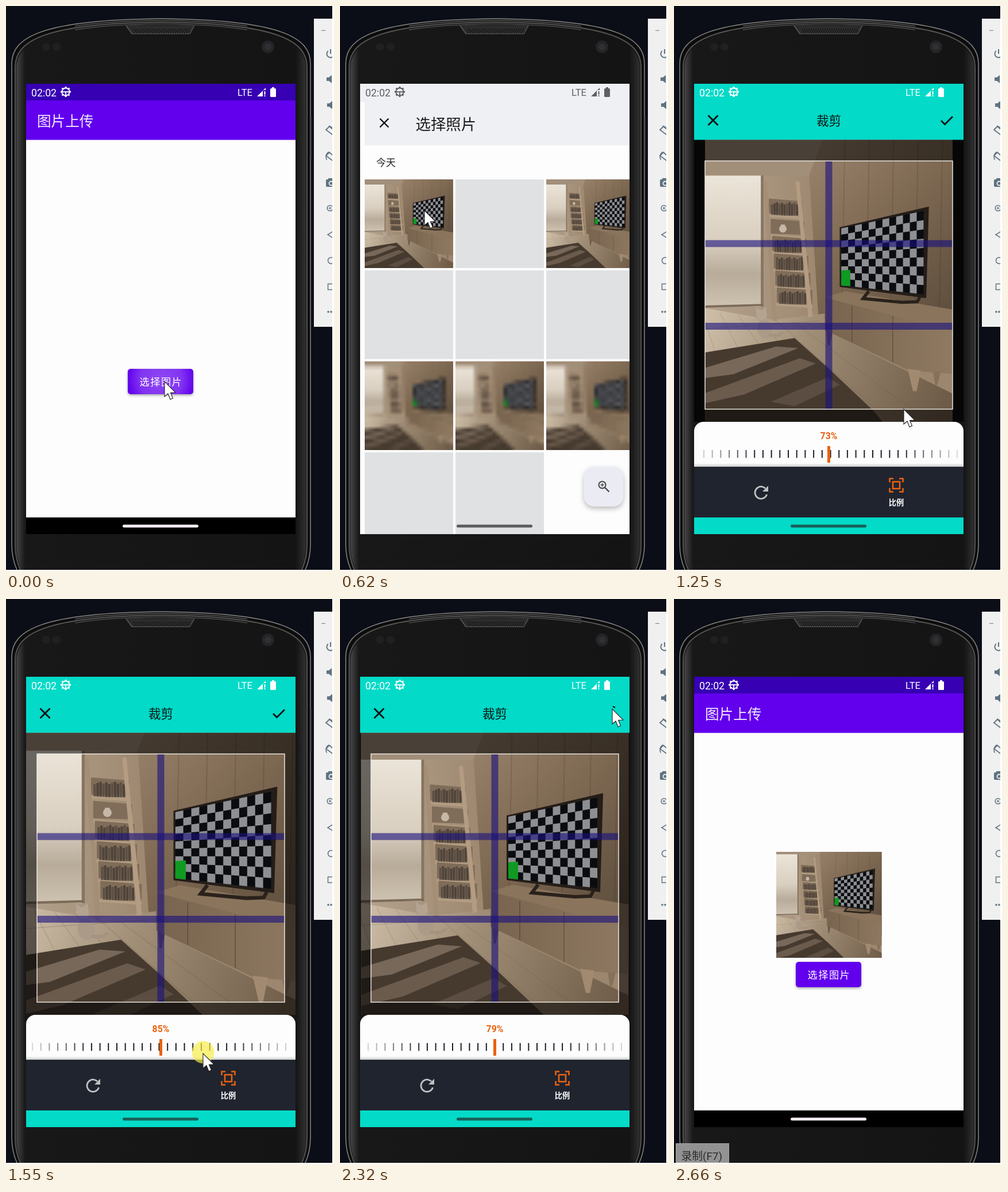
An HTML page with a canvas that plays this animation: 571x981 px, repeating every 2.72 s.

```html
<!DOCTYPE html>
<html lang="zh">
<head>
<meta charset="utf-8">
<title>图片上传</title>
<style>
html, body { margin: 0; width: 571px; height: 981px; overflow: hidden; background: #fff; }
canvas { display: block; }
</style>
</head>
<body>
<canvas id="stage" width="571" height="981"></canvas>
<script>
const stage = document.getElementById('stage');
let c = stage.getContext('2d');
const LOOP = 2720;
const starts = [0, 150, 310, 460, 620, 770, 940, 1090, 1250, 1400, 1550, 1680, 1850, 2000, 2150, 2320, 2470, 2660];
const pointer = [[276, 652], [278, 655], [297, 694], [250, 570], [147, 355], [147, 357], [178, 371], [250, 480],
  [400, 700], [420, 788], [343, 789], [360, 789], [400, 789], [419, 789], [450, 480], [474, 191], [474, 191]];
const ORANGE = '#e8620f', TEAL = '#03dac8', PURPLE = '#6200ee';

// ---- helpers ----
function rect(x, y, w, h, color, r = 0) {
  c.fillStyle = color;
  c.beginPath();
  c.roundRect(x, y, w, h, r);
  c.fill();
}
function trace(pts) {
  c.beginPath();
  for (let i = 0; i < pts.length; i += 2) c.lineTo(pts[i], pts[i + 1]);
}
function poly(color, ...pts) {
  trace(pts);
  c.closePath();
  c.fillStyle = color;
  c.fill();
}
function line(color, width, ...pts) {
  trace(pts);
  c.strokeStyle = color;
  c.lineWidth = width;
  c.stroke();
}
function disc(x, y, r, color) {
  c.fillStyle = color;
  c.beginPath();
  c.arc(x, y, r, 0, 7);
  c.fill();
}
function ring(x, y, r, color, width, from = 0, to = Math.PI * 2) {
  c.strokeStyle = color;
  c.lineWidth = width;
  c.beginPath();
  c.arc(x, y, r, from, to);
  c.stroke();
}
function ramp(x0, y0, x1, y1, ...stops) {
  const g = c.createLinearGradient(x0, y0, x1, y1);
  stops.forEach(([at, color]) => g.addColorStop(at, color));
  return g;
}
function text(s, x, y, size, color, align = 'left', weight = 400, spacing = 0) {
  c.font = `${weight} ${size}px Roboto, "Noto Sans CJK SC", "Noto Sans CJK", sans-serif`;
  c.letterSpacing = spacing + 'px';
  c.textAlign = align;
  c.fillStyle = color;
  c.fillText(s, x, y + size * 0.37);
}
function clipped(x, y, w, h, r, draw) {
  c.save();
  c.beginPath();
  c.roundRect(x, y, w, h, r);
  c.clip();
  draw();
  c.restore();
}
function cross(x, y, r, width) {
  line('#111', width, x - r, y - r, x + r, y + r);
  line('#111', width, x + r, y - r, x - r, y + r);
}
function magnifier(x, y, s, color) {
  ring(x, y, 6 * s, color, 2 * s);
  line(color, 2.4 * s, x + 4.5 * s, y + 4.5 * s, x + 12 * s, y + 12 * s);
  line(color, 1.5 * s, x - 3 * s, y, x + 3 * s, y);
  line(color, 1.5 * s, x, y - 3 * s, x, y + 3 * s);
}

// ---- room picture, drawn around its centre (269.5, 484.5) ----
function tv() {
  line('#2a221b', 6, 345, 496, 334, 510, 408, 517, 436, 516, 441, 507);
  poly('#241d18', 290, 376, 458, 337, 453, 509, 290, 488);
  const cols = 12, rows = 9;
  const at = (u, v) => {
    const top = 378 - 33 * u, bottom = 485 + 17 * u;
    return [293 + 155 * u, top + (bottom - top) * v];
  };
  poly('#0b0c10', ...at(0, 0), ...at(1, 0), ...at(1, 1), ...at(0, 1));
  for (let i = 0; i < cols; i++) for (let j = i % 2; j < rows; j += 2) {
    const u = i / cols, v = j / rows, u2 = u + 1 / cols, v2 = v + 1 / rows;
    poly('#8e8f92', ...at(u, v), ...at(u2, v), ...at(u2, v2), ...at(u, v2));
  }
  poly('#0f9a22', 293, 457, 310, 456, 310, 487, 293, 485);
}
function shelf() {
  [352, 390, 422, 455, 487, 519].forEach((y, row) => {
    const x = 151 + (y - 290) * 0.09, w = 62 + row;
    poly('#806d59', x, y - 30, x + w, y - 25, x + w, y, x, y - 2);
    if (row === 1) {
      disc(x + 23, y - 11, 7, '#c5b8a6');
      rect(x + 19, y - 19, 8, 4, '#c5b8a6');
    } else {
      for (let b = 0; b < 11; b++) {
        const h = 19 + (b * 7 + row * 3) % 5;
        rect(x + 4 + b * 4.7, y - h, 4, h + 2, b % 3 ? '#50443a' : '#5d5045');
      }
    }
    poly('#b29c82', x - 2, y, x + w, y + 4, x + w, y + 9, x - 2, y + 4);
  });
  poly('#a48e75', 146, 290, 153, 290, 172, 552, 164, 552);
  poly('#b39c82', 207, 290, 214, 290, 239, 543, 231, 546);
}
function cat() {
  c.fillStyle = '#aa9a87';
  c.beginPath();
  c.ellipse(149, 567, 14, 18, -0.2, 0, 7);
  c.fill();
  disc(143, 541, 10, '#b3a390');
  poly('#b3a390', 133, 540, 132, 525, 142, 533, 151, 525, 153, 540);
  line('#a39380', 5, 156, 579, 176, 579, 184, 573);
}
function room() {
  rect(36, 200, 470, 580, ramp(36, 0, 260, 0, [0, '#b5a38e'], [1, '#9c866e']));
  poly(ramp(235, 250, 500, 520, [0, '#98816a'], [0.5, '#7c6751'], [1, '#60503f']),
    262, 200, 506, 200, 506, 620, 250, 545, 232, 269);
  for (let x = 300; x < 500; x += 46) line('rgba(50,36,24,.16)', 2, x, 200, x - 6, 530);
  poly('#a28f7a', 36, 200, 262, 200, 232, 279, 36, 279);
  rect(30, 279, 112, 246, ramp(0, 279, 0, 525, [0, '#ebe4d8'], [0.5, '#d9cfc0'], [0.75, '#b8ab9a'], [1, '#cec2b1']));
  line('#867560', 5, 144, 279, 144, 525);
  line('#7b6b58', 4, 36, 525, 146, 522);
  poly(ramp(36, 530, 480, 720, [0, '#cfc0aa'], [0.4, '#a28f78'], [1, '#6f5c48']),
    30, 527, 164, 550, 262, 538, 262, 570, 506, 690, 506, 790, 30, 790);
  for (let i = 0; i < 6; i++) line('rgba(90,70,50,.25)', 1, 30 + i * 34, 532 + i * 4, 110 + i * 80, 780);
  line('rgba(90,70,50,.25)', 1, 36, 567, 250, 552);
  poly('#463a2f', 30, 612, 205, 584, 268, 640, 355, 722, 410, 790, 30, 790);
  poly('#78685a', 30, 642, 170, 600, 212, 603, 90, 652, 30, 660);
  poly('#6b5b4d', 30, 690, 215, 622, 245, 632, 110, 690, 30, 708);
  poly('#5b4d41', 160, 704, 268, 658, 290, 672, 205, 712);
  shelf();
  cat();
  poly('#8a745c', 262, 508, 300, 496, 506, 531, 506, 575);
  poly(ramp(262, 0, 500, 0, [0, '#78644f'], [1, '#8f7961']), 262, 508, 506, 572, 506, 652, 420, 645, 262, 569);
  line('rgba(50,36,24,.4)', 1.5, 313, 524, 313, 592);
  line('rgba(50,36,24,.4)', 1.5, 390, 543, 390, 630);
  poly('#a18a70', 418, 642, 443, 645, 435, 684, 428, 684);
  poly('#86715a', 466, 648, 480, 648, 474, 672, 470, 672);
  poly('#6d5944', 265, 569, 276, 576, 271, 598, 267, 598);
  tv();
}
function photo(cx, cy, k) {
  c.save();
  c.translate(cx, cy);
  c.scale(k, k);
  c.translate(-269.5, -484.5);
  c.beginPath();
  c.rect(36.5, 200, 466, 569);
  c.clip();
  room();
  c.restore();
}
function thumb(x, y, size, r = 0) {
  clipped(x, y, size, size, r, () => photo(x + size / 2, y + size / 2, size / 465));
}
const tiny = document.createElement('canvas');
tiny.width = tiny.height = 24;
{
  const main = c;
  c = tiny.getContext('2d');
  thumb(0, 0, 24);
  c = main;
}

// ---- device ----
function shell(d) {
  c.beginPath();
  c.moveTo(20 + d, 981);
  c.quadraticCurveTo(10 + d, 960, 10 + d, 935);
  c.lineTo(10 + d, 100 + d);
  c.bezierCurveTo(10 + d, 55 + d, 60 + d, 24 + d, 270, 22 + d);
  c.bezierCurveTo(480 - d, 24 + d, 530 - d, 55 + d, 530 - d, 100 + d);
  c.lineTo(530 - d, 935);
  c.quadraticCurveTo(530 - d, 960, 520 - d, 981);
}
function edge(d, color, width) {
  shell(d);
  c.strokeStyle = color;
  c.lineWidth = width;
  c.stroke();
}
function device() {
  rect(0, 0, 571, 981, '#fff');
  rect(0, 0, 568, 979, '#0b0e16');
  clipped(0, 0, 568, 979, 0, () => {
    shell(0);
    c.fillStyle = '#151515';
    c.fill();
    edge(3, '#0c0c0c', 4);
    edge(0, '#858585', 1.5);
    edge(6, '#555', 2);
    shell(8);
    c.fillStyle = ramp(18, 0, 522, 0, [0, '#464646'], [0.03, '#181818'], [0.5, '#161616'], [0.965, '#141414'], [1, '#303030']);
    c.fill();
    clipped(120, 18, 300, 26, 0, () => {
      edge(3, 'rgba(150,150,150,.55)', 1.5);
      edge(9, 'rgba(150,150,150,.4)', 1.5);
    });
    poly('#2b2b2b', 209, 33, 328, 33, 320, 48, 219, 48);
    line('#5a5a5a', 1.5, 209, 34, 219, 48, 320, 48, 328, 34);
    for (let y = 40; y < 47; y += 3) for (let x = 222; x < 319; x += 4) rect(x + y % 2 * 2, y, 2, 1.5, '#111');
    disc(70, 71, 7, '#202020');
    disc(88, 71, 7, '#202020');
    disc(456, 71, 11, '#252527');
    disc(456, 71, 6, '#303034');
    rect(530, 192, 2, 73, '#3a3a3a');
  });
}
function toolbar() {
  const ink = '#5f7380';
  rect(536, 22, 32, 535, '#f0f0f0');
  clipped(536, 22, 32, 535, 0, () => {
    line('#888', 1.2, 549, 42.5, 556, 42.5);
    ring(565, 83, 6.5, ink, 2, -0.9, 4);
    line(ink, 2, 565, 75, 565, 83);
    [127, 172].forEach((y, i) => {
      poly(ink, 558 + i, y - 3, 562 + i, y - 3, 567 + i, y - 7, 567 + i, y + 7, 562 + i, y + 3, 558 + i, y + 3);
    });
    [217, 262].forEach((y, i) => {
      line(ink, 1.8, 572, y + 9, 557, y - 2, 563, y - 8, 574, y + 2);
      if (i) ring(567, y, 10, ink, 1.5, 2.6, 4.2);
      else line(ink, 1.5, 562, y - 9, 568, y - 6);
    });
    rect(557, 301, 16, 13, ink, 2);
    rect(561, 299, 9, 4, ink);
    ring(566, 308, 3.5, '#f0f0f0', 1.8);
    magnifier(564, 351, 0.8, ink);
    line(ink, 1.5, 570, 391, 560, 397, 570, 403);
    ring(566, 442, 5.5, ink, 1.5);
    c.strokeRect(560.5, 482.5, 10, 10);
    disc(561, 531, 1.8, ink);
    disc(566, 531, 1.8, ink);
  });
}
function status(color) {
  text('02:02', 44, 150, 17.7, color);
  for (let i = 0; i < 8; i++) {
    const a = i * Math.PI / 4, x = Math.cos(a), y = Math.sin(a);
    line(color, 3, 104 + x * 6, 149 + y * 6, 104 + x * 9, 149 + y * 9);
  }
  ring(104, 149, 6.5, color, 1.8);
  line(color, 1.8, 98, 149, 110, 149);
  line(color, 1.8, 104, 149, 104, 155);
  text('LTE', 403, 150, 16.6, color);
  poly(color, 437, 157, 452, 142, 452, 146, 447, 146, 447, 157);
  rect(449.5, 148, 2, 6, color);
  rect(449.5, 155, 2, 2, color);
  rect(460, 143, 10, 15, color, 1.5);
  rect(463, 141, 4, 3, color);
}
function handle(color) {
  rect(203, 900.5, 132, 5, color, 2.5);
}
function cursor([x, y]) {
  c.save();
  c.translate(x, y);
  poly('#fff', 0, 0, 0, 26, 6, 21, 10, 31, 14.5, 29, 10.5, 19.5, 19, 19);
  c.strokeStyle = '#222';
  c.lineWidth = 1.1;
  c.stroke();
  c.restore();
}

// ---- screens ----
function home(ripple, picked) {
  rect(35, 135, 469, 782, '#fdfdfd');
  rect(35, 135, 469, 29, '#3700b3');
  rect(35, 164, 469, 68.5, PURPLE);
  text('图片上传', 54, 200, 24.6, '#f4ecfe');
  if (picked) clipped(178, 439, 183.5, 184, 0, () => photo(269.5, 531, 0.427));
  c.shadowColor = 'rgba(0,0,0,.35)';
  c.shadowBlur = 4;
  c.shadowOffsetY = 2;
  rect(212, 630, 114, 44, PURPLE, 5);
  c.shadowColor = 'transparent';
  if (ripple) {
    const g = c.createRadialGradient(270, 648, 5, 270, 648, 58);
    g.addColorStop(0, 'rgba(255,255,255,.27)');
    g.addColorStop(0.6, 'rgba(255,255,255,.2)');
    g.addColorStop(1, 'rgba(255,255,255,0)');
    rect(212, 630, 114, 44, g, 5);
  }
  text('选择图片', 232.5, 653, 17.2, '#fff', 'left', 400, 1.5);
  rect(35, 888, 469, 29, '#000');
}
function sheet(dy, alpha, dim) {
  rect(35, 135, 469, 753, `rgba(0,0,0,${dim})`);
  c.save();
  c.beginPath();
  c.rect(35, 135, 469, 751);
  c.clip();
  c.translate(0, dy);
  c.globalAlpha = alpha;
  rect(35, 643, 469, 243, '#f7f7f7', [16, 16, 0, 0]);
  c.globalAlpha = Math.min(1, alpha + 0.1);
  text('从相册选取', 270, 681, 22, '#3c0f96', 'center', 500);
  rect(35, 716, 469, 1, '#dedede');
  text('拍一张', 270, 755, 18.8, '#351c1e', 'center', 500);
  rect(53, 791, 433, 9.5, '#dcdcdc');
  text('取消', 269.5, 838, 19.5, '#636363', 'center', 500);
  c.restore();
}
function gallery(dx, load, chosen) {
  clipped(35, 135, 469, 782, 0, () => {
    rect(35, 135, 469, 782, '#fdfdfd');
    rect(35, 135, 469, 32, '#eff0f4');
    c.translate(dx, 0);
    rect(35, 135, 469, 107, '#eff0f4');
    cross(69, 203, 7.5, 2.4);
    text('选择照片', 123.5, 205, 26.4, '#1c1c1e');
    text('今天', 55, 272, 17, '#222');
    for (let i = 0; i < 11; i++) {
      const x = 35 + i % 3 * 158, y = 301 + Math.floor(i / 3) * 158;
      rect(x, y, 154, 154, '#e0e1e3');
      if (!load || i === 1 || (i > 2 && i < 6)) continue;
      if (i === 0 && chosen) {
        rect(x, y, 154, 154, '#e1e1ee');
        thumb(x + 15, y + 15, 125, 16);
      } else if (i < 3 || load === 2) thumb(x, y, 154);
      else if (i < 9) c.drawImage(tiny, x, y, 154, 154);
    }
    c.shadowColor = 'rgba(0,0,0,.25)';
    c.shadowBlur = 8;
    c.shadowOffsetY = 4;
    rect(416.5, 800, 69, 69, '#ebecf3', 18);
    c.shadowColor = 'transparent';
    magnifier(448.5, 831.5, 1, '#444');
  });
}
function ruler(pct) {
  const gap = 14.7, shift = (79 - pct) * 12.75;
  const phase = ((shift % gap) + gap) % gap;
  for (let x = 269.5 + phase - 16 * gap; x < 497; x += gap) {
    if (x < 44) continue;
    const near = Math.min(x - 36, 503 - x) / 117;
    rect(x - 1, 771, 2, 13.5, `rgba(28,32,42,${Math.min(1, near + 0.08)})`);
  }
  rect(267, 764, 5, 29, ORANGE, 1);
}
function crop(dx, pct, done) {
  clipped(35, 135, 469, 782, 0, () => {
    c.translate(dx, 0);
    rect(35, 135, 469, 782, TEAL);
    cross(68, 198.5, 8.5, 2.8);
    text('裁剪', 269.5, 199, 21.6, '#0a1513', 'center', 500);
    if (done) line('#111', 2, 475, 186.5, 479, 188.5);
    else line('#111', 2.8, 465, 199, 471.5, 205.5, 485, 192);
    clipped(35, 232.5, 469, 490, 0, () => {
      rect(35, 232, 469, 500, '#0d0d0d');
      photo(269.5, 484.5, pct / 79);
      c.fillStyle = 'rgba(0,0,0,.55)';
      c.beginPath();
      c.rect(35, 232, 469, 500);
      c.rect(54, 269, 431, 431);
      c.fill('evenodd');
      const mesh = 'rgba(24,16,125,.6)';
      rect(263.5, 269, 12, 431, mesh);
      rect(54, 406.5, 431, 12, mesh);
      rect(54, 550, 431, 12, mesh);
      c.strokeStyle = '#f3efe9';
      c.lineWidth = 1.4;
      c.strokeRect(54, 269, 431, 431);
    });
    rect(35, 700, 469, 22, 'rgba(0,0,0,0)');
    clipped(35, 722, 469, 80, 0, () => {
      rect(35, 722, 469, 80, '#1b1612');
      rect(35, 722, 469, 78, '#fdfdfd', [16, 16, 0, 0]);
      rect(35, 794, 469, 6, ramp(0, 794, 0, 800, [0, 'rgba(0,0,0,0)'], [1, 'rgba(0,0,0,.2)']));
    });
    text(Math.round(pct) + '%', 269.5, 746, 15.8, ORANGE, 'center', 700);
    ruler(pct);
    rect(35, 800, 469, 88, '#20242f');
    ring(151.5, 845, 10.5, '#bfc2c2', 2.8, 0.3, 5.5);
    poly('#bfc2c2', 164, 833, 164, 843, 154, 843);
    c.save();
    c.translate(387, 832);
    for (let i = 0; i < 4; i++) {
      line(ORANGE, 2.6, -11.5, -5, -11.5, -11.5, -5, -11.5);
      c.rotate(Math.PI / 2);
    }
    c.strokeRect(-6, -6, 12, 12);
    c.restore();
    text('比例', 387, 862, 13.2, '#fff', 'center', 700);
  });
}
function label() {
  rect(3, 945, 93, 34, '#929292');
  c.strokeStyle = '#a6a6a6';
  c.lineWidth = 1;
  c.strokeRect(3.5, 945.5, 92, 33);
  text('录制(F7)', 12.5, 967, 18.8, '#2c2c2c');
}

function render(ms) {
  let step = starts.length - 1;
  while (starts[step] > ms) step--;
  device();
  toolbar();
  let ink = '#fff', bar = '#f4eef4';
  if (step < 3) {
    home(step < 2, false);
    if (step === 1) sheet(60, 0.5, 0.22);
    if (step === 2) sheet(0, 0.85, 0.4);
  } else if (step < 7) {
    gallery([36, 8, 0, 0][step - 3], Math.min(2, step - 3), step === 6);
    ink = '#5f5f63';
    bar = step < 5 ? '#5c5c5c' : '#d6cec6';
  } else if (step < 16) {
    const dragging = step > 8 && step < 14;
    const pct = dragging ? 85 - (pointer[step][0] - 343) / 12.75 : step < 9 ? 73 : 79;
    crop(step === 7 ? 8 : 0, pct, step === 15);
    if (dragging) disc(pointer[step][0], 787, 19.5, 'rgba(250,238,70,.68)');
    bar = '#175f57';
  } else {
    home(false, true);
  }
  status(ink);
  handle(bar);
  if (pointer[step]) cursor(pointer[step]);
  else label();
}
function tick(now) {
  render(now % LOOP);
  requestAnimationFrame(tick);
}
render(0);
requestAnimationFrame(tick);
</script>
</body>
</html>
```
